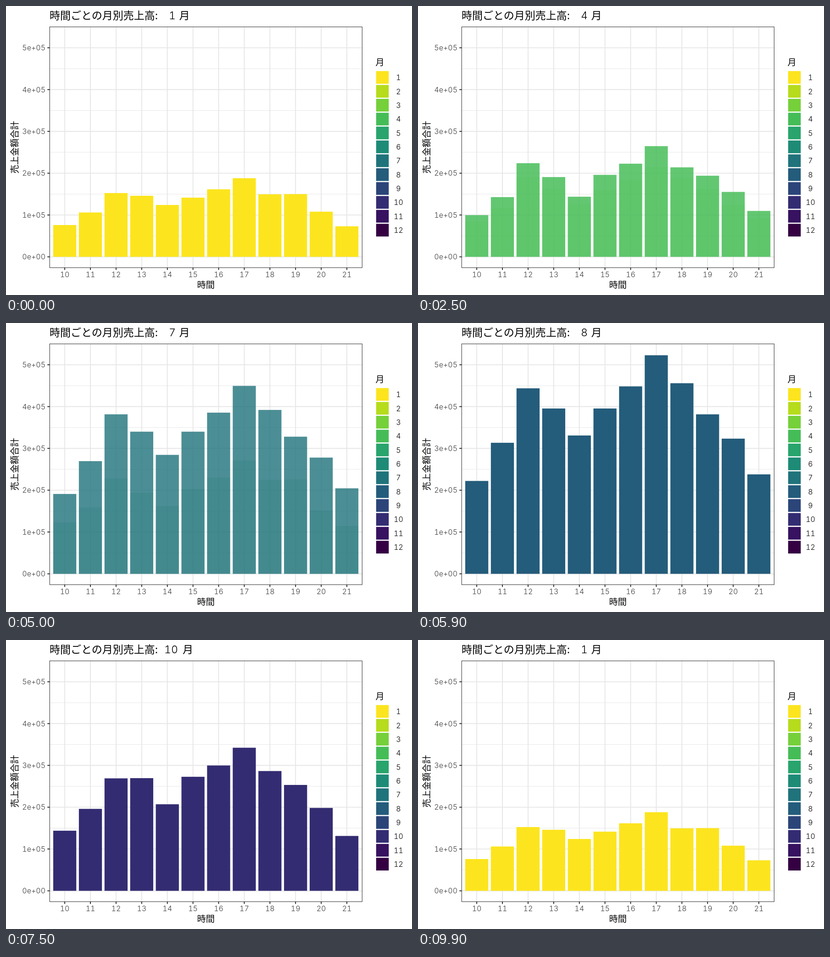
An HTML page for the animation above (10000 ms loop, 885 px wide and 632 px high).

```html
<!DOCTYPE html>
<html lang="ja">
<head>
<meta charset="utf-8">
<title>時間ごとの月別売上高</title>
<style>
  html, body { margin: 0; width: 100%; height: 100%; overflow: hidden; background: #fff; }
  svg { display: block; width: 885px; height: 632px; }
  text { font-family: "Noto Sans CJK JP", "Noto Sans CJK", sans-serif; font-weight: 350; }
  .num { font-family: Inter, sans-serif; font-weight: 300; font-variant-numeric: tabular-nums; }
</style>
</head>
<body>
<svg id="chart" viewBox="0 0 885 632"></svg>
<script>
const chart = document.getElementById('chart');
const panel = { left: 95.2, top: 45.7, right: 776.3, bottom: 572.2 };
const GRID = '#e6e6e6', INK = '#262626', AXIS = '#3c3c3c';
const MAJOR = 1.86, MINOR = 0.93;

const colors = ['#fce51e', '#b6dc1c', '#75d03a', '#45bd57', '#28a46c', '#1e8b77',
                '#20737b', '#245c7b', '#2b4579', '#332c72', '#371260', '#340042'];

// Sales in thousands, for the hours 10 to 21.
const jan = [76, 106, 152.5, 146, 124, 141.5, 161.5, 188, 149.5, 150, 108, 73];
const feb = [70.5, 86, 128.5, 122, 89, 126, 127, 160.5, 128.5, 124, 93.5, 64.5];
const mar = [84.5, 117.5, 191, 162.5, 125.5, 160.5, 184, 215, 189.5, 162.5, 124, 93];
const may = [115, 168, 257, 219, 162, 231.5, 261.5, 314.5, 238.5, 225.5, 186.5, 126.5];
const jun = [123, 159, 228, 194, 162.5, 203, 230, 271, 225, 226, 151.5, 114.5];
const jul = [191, 269.5, 381.5, 340, 284.5, 340, 385.5, 449.5, 392, 328, 278, 204.5];
const sep = [186, 238.5, 329, 341, 263.5, 336, 367.5, 423, 371, 320, 254.5, 169.5];
const nov = [101.5, 153.5, 209, 198, 150.5, 209.5, 232, 261.5, 202, 186.5, 142, 93];
const dec = [84, 110.5, 162.5, 145.5, 119, 161.5, 167, 199.5, 169, 148.5, 126.5, 89];
const between = (a, b) => a.map((v, i) => (v + b[i]) / 2);
const aug = jul.map(v => v * 1.163);
const sales = [jan, feb, mar, between(mar, may), may, jun, jul, aug, sep, between(sep, nov), nov, dec];

const xOf = hour => 128.1 + 55.9 * (hour - 10);
const yOf = thousands => 548.5 - 0.9143 * thousands;

function add(parent, tag, attrs, content) {
  const node = document.createElementNS('http://www.w3.org/2000/svg', tag);
  for (const name in attrs) node.setAttribute(name, attrs[name]);
  if (content !== undefined) node.textContent = content;
  return parent.appendChild(node);
}
const line = (x1, y1, x2, y2, stroke, width) =>
  add(chart, 'line', { x1, y1, x2, y2, stroke, 'stroke-width': width });
const label = (x, y, size, content, attrs) =>
  add(chart, 'text', { x, y, 'font-size': size, ...attrs }, content);

// Grid
for (let v = 50; v < 500; v += 100) line(panel.left, yOf(v), panel.right, yOf(v), GRID, MINOR);
for (let v = 0; v <= 500; v += 100) line(panel.left, yOf(v), panel.right, yOf(v), GRID, MAJOR);
for (let h = 10; h <= 21; h++) line(xOf(h), panel.top, xOf(h), panel.bottom, GRID, MAJOR);

// Bars, two layers for cross-fading
const layers = [0, 1].map(() => {
  const group = add(chart, 'g', {});
  const bars = jan.map((_, i) => add(group, 'rect', { x: xOf(10 + i) - 25.15, width: 50.3 }));
  return { group, bars };
});

// Frame and axes
add(chart, 'rect', {
  x: panel.left, y: panel.top, width: panel.right - panel.left, height: panel.bottom - panel.top,
  fill: 'none', stroke: INK, 'stroke-width': 1
});
for (let i = 0; i <= 5; i++) {
  const y = yOf(i * 100);
  line(panel.left - 5, y, panel.left, y, INK, MAJOR);
  label(86, y + 5.8, 16, `${i}e+05`.replace('0e+05', '0e+00'),
    { class: 'num', fill: AXIS, 'text-anchor': 'end' });
}
for (let h = 10; h <= 21; h++) {
  line(xOf(h), panel.bottom, xOf(h), panel.bottom + 5, INK, MAJOR);
  label(xOf(h), 593, 16, h, { class: 'num', fill: AXIS, 'text-anchor': 'middle' });
}
label(435.7, 617.3, 19.2, '時間', { 'text-anchor': 'middle' });
label(0, 0, 19.2, '売上金額合計', { 'text-anchor': 'middle', transform: 'translate(25.5 309) rotate(-90)' });

// Legend
label(805.5, 129.5, 19.2, '月');
colors.forEach((fill, i) => {
  const y = 156.2 + 30.36 * i;
  add(chart, 'rect', { x: 806.8, y: y - 13.9, width: 27.5, height: 27.8, fill });
  label(855.5, y + 6, 16, i + 1, { class: 'num', 'text-anchor': 'middle' });
});

// Title
label(95, 29, 23, '時間ごとの月別売上高:');
const monthNumber = label(0, 29, 23, '', { class: 'num', 'text-anchor': 'middle' });
const monthUnit = label(0, 29, 23, '月');

function showLayer({ group, bars }, month, opacity) {
  group.setAttribute('fill', colors[month]);
  group.setAttribute('opacity', opacity);
  bars.forEach((bar, i) => {
    const height = yOf(0) - yOf(sales[month][i]);
    bar.setAttribute('y', yOf(0) - height);
    bar.setAttribute('height', height);
  });
}

const fadeStart = i => 3 + 9 * Math.min(i, 5) + 8 * Math.max(0, i - 5);

function render(now) {
  let step = Math.floor(now / 100) % 100;
  if (step >= 50) step++; // 101 steps are shown in 100 ticks; the middle one is skipped

  let from = 0;
  while (from < 11 && step >= fadeStart(from + 1)) from++;
  const to = (from + 1) % 12;
  const fadeSteps = from < 5 ? 6 : 5;
  const progress = Math.min(1, Math.max(0, (step - fadeStart(from) + 1) / fadeSteps));

  showLayer(layers[0], from, 1 - progress);
  showLayer(layers[1], to, progress);

  const month = (progress > 0.5 ? to : from) + 1;
  monthNumber.textContent = month;
  monthNumber.setAttribute('x', month < 10 ? 362.5 : 360);
  monthUnit.setAttribute('x', month < 10 ? 377.5 : 385);
}

function tick() {
  render(performance.now());
  requestAnimationFrame(tick);
}
tick();
</script>
</body>
</html>
```
